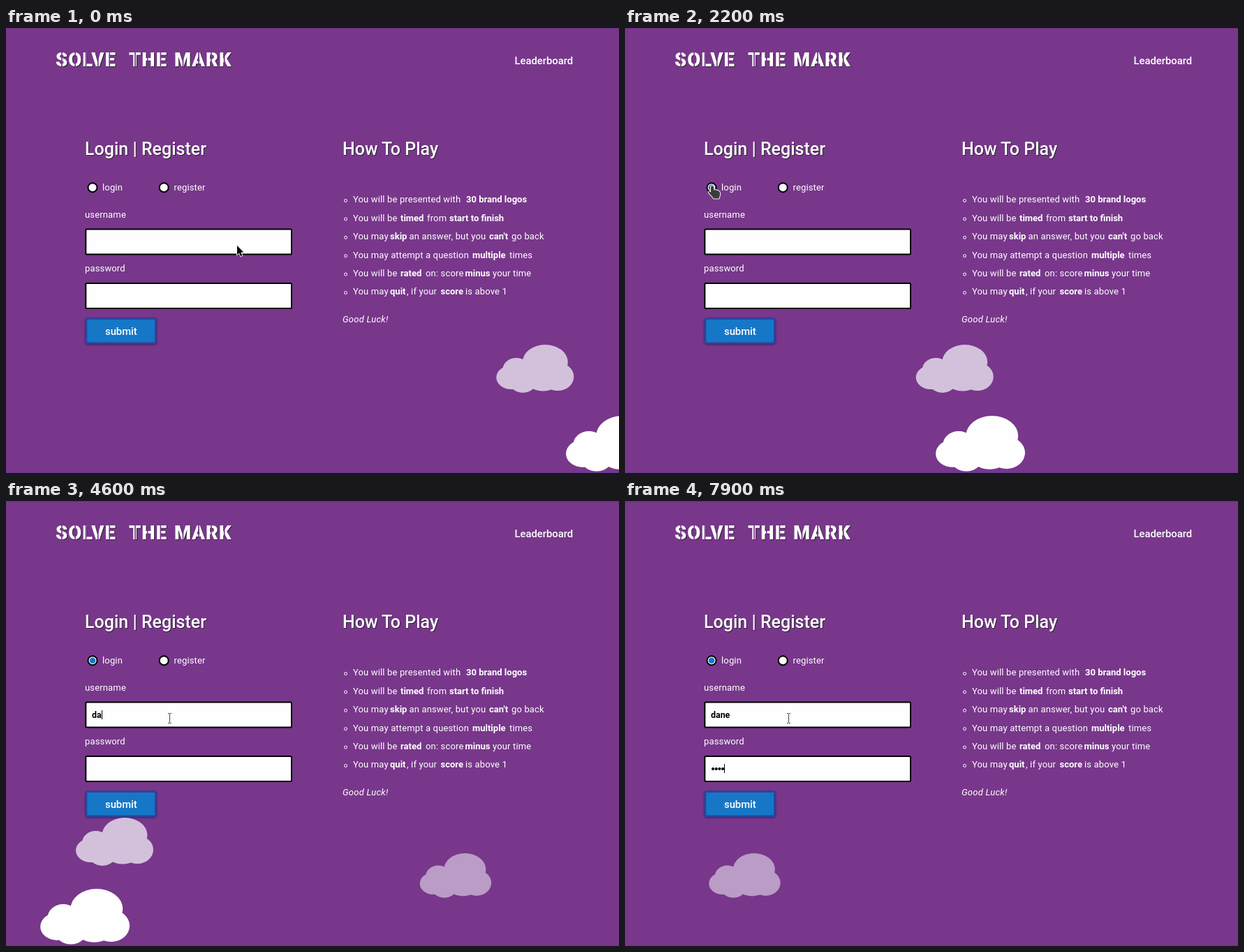
Recreate the animation shown at these times as an HTML page with a canvas. Size 878 by 638 pixels, loop 8 s.

```html
<!DOCTYPE html>
<html lang="en">
<head>
<meta charset="utf-8">
<title>Login</title>
<style>
  html, body { margin: 0; width: 878px; height: 638px; overflow: hidden; background: #78378b; }
  svg, canvas { position: absolute; left: 0; top: 0; display: block; }
  text { font: 400 13px Roboto, sans-serif; letter-spacing: .15px; fill: #fff; white-space: pre; }
  .b { font-weight: 700; letter-spacing: 0; }
  .i { font-style: italic; letter-spacing: .25px; }
  .h { font-size: 25px; font-weight: 500; letter-spacing: 0; filter: drop-shadow(1.3px 1.3px .4px #2b2530); }
  .t { font-size: 27.5px; font-weight: 900; letter-spacing: 1px; filter: drop-shadow(1.2px 1.2px .4px #2b2530); }
  .n { font-size: 14.8px; font-weight: 500; letter-spacing: 0; }
  .box { fill: #fffeff; stroke: #000; stroke-width: 2; }
  .btn { fill: #1677c7; stroke: #28449f; stroke-width: 2.5; filter: drop-shadow(0 1px 1.5px #33205a); }
  .dot { fill: none; stroke: #fff; stroke-width: 1; }
</style>
</head>
<body>
<svg id="page" width="878" height="638">
  <rect width="878" height="1" fill="#6a2f7d"/>
  <rect y="637" width="878" height="1" fill="#67398f"/>
  <rect class="box" x="114.3" y="288.5" width="294.7" height="36" rx="1.5"/>
  <rect class="box" x="114.3" y="366" width="294.7" height="36" rx="1.5"/>
  <rect class="btn" x="115" y="416.7" width="99.3" height="35" rx="2"/>
  <circle class="box" cx="124" cy="228.7" r="6.5"/>
  <circle class="box" cx="226.2" cy="228.7" r="6.5"/>
</svg>
<canvas id="view" width="878" height="638"></canvas>
<script>
const page = document.getElementById('page');
const ctx = document.getElementById('view').getContext('2d');
const USER = 'dane';
const LOOP = 8000;

function add(tag, attrs, content) {
  const el = document.createElementNS('http://www.w3.org/2000/svg', tag);
  for (const k in attrs) el.setAttribute(k, attrs[k]);
  if (content) el.textContent = content;
  return page.appendChild(el);
}
const label = (x, y, str, cls = '') => add('text', { x, y, class: cls }, str);

// Stencil title: each glyph is cut by a thin vertical slit
const slits = { S: .5, O: .5, L: .42, V: .5, E: .42, T: .5, H: .42, M: .5, A: .5, R: .42, K: .42 };
for (const [x, word] of [[71, 'SOLVE'], [176, 'THE'], [241, 'MARK']]) {
  const el = label(x, 54.5, word, 't');
  [...word].forEach((c, i) => {
    const g = el.getExtentOfChar(i);
    add('rect', { x: g.x + g.width * slits[c] - 1, y: 33, width: 1.7, height: 24, fill: '#78378b' });
  });
}

label(728.5, 52, 'Leaderboard', 'n');
label(113, 181.5, 'Login | Register', 'h');
label(482, 181.5, 'How To Play', 'h');
label(138, 232.5, 'login');
label(240.5, 232.5, 'register');
label(113, 271.5, 'username');
label(113, 349, 'password');
label(142, 440, 'submit', 'n');
label(482, 421.5, 'Good Luck!', 'i');

// Rules: alternating plain and bold runs
const rules = [
  [497, 'You will be presented with', 659, '30 brand logos'],
  [497, 'You will be', 565, 'timed', 603, 'from', 635, 'start to finish'],
  [497, 'You may', 550, 'skip', 577.5, 'an answer, but you', 692, "can't", 724, 'go back'],
  [497, 'You may attempt a question', 668, 'multiple', 721, 'times'],
  [497, 'You will be', 565, 'rated', 601, 'on: score', 657.5, 'minus', 697, 'your time'],
  [497, 'You may', 550, 'quit', 574, ', if your', 622.5, 'score', 658, 'is above 1']
];
rules.forEach((runs, row) => {
  const y = 250.3 + row * 26.4;
  add('circle', { class: 'dot', cx: 486.5, cy: y - 2.8, r: 2 });
  for (let i = 0; i < runs.length; i += 2) label(runs[i], y, runs[i + 1], i % 4 ? 'b' : '');
});

// Linear interpolation through [time, value...] keys
function track(keys, t) {
  let i = 1;
  while (i < keys.length - 1 && t > keys[i][0]) i++;
  const a = keys[i - 1], b = keys[i];
  const p = Math.min(1, (t - a[0]) / (b[0] - a[0]));
  return a.slice(1).map((v, k) => v + (b[k + 1] - v) * p);
}

// Shared drift of all clouds; each has its own rate
const drift = [[0, 0], [800, 104.3], [900, 126.4], [2200, 285.6], [3600, 477.5], [4500, 591],
  [4600, 602.3], [5400, 711.2], [6300, 824.3], [6400, 836.2], [7200, 947.4], [7900, 1036.6]];
const clouds = [
  { x: 702.3, y: 454, rate: 1, size: 1, color: '#d3c1db' },
  { x: 802, y: 556, rate: 1.25, size: 1.153, color: '#fefefe' },
  { x: 1248, y: 505, rate: 1.088, size: .923, color: '#ba9cc6' }
];
const puffs = [[70, 25, 32.5, 25], [28.5, 36, 19.5, 17], [21, 47, 21, 17], [38, 54, 19, 15],
  [67, 50, 24, 16.5], [88, 46, 23, 20], [56, 42, 30, 18]];

function cloud(c, d) {
  ctx.save();
  ctx.translate(c.x - d * c.rate, c.y);
  ctx.scale(c.size, c.size);
  ctx.fillStyle = c.color;
  ctx.beginPath();
  for (const [x, y, rx, ry] of puffs) {
    ctx.moveTo(x + rx, y);
    ctx.ellipse(x, y, rx, ry, 0, 0, Math.PI * 2);
  }
  ctx.fill();
  ctx.restore();
}

const mouse = [[0, 331, 312], [300, 318, 308], [600, 262, 292], [800, 200, 268], [900, 143, 240],
  [1000, 125, 226.5], [2400, 125, 226.5], [2500, 150, 245], [2600, 205, 286], [2700, 234, 311]];
const arrow = new Path2D('M0 0V13L3 10.4L5.2 15.2L7.4 14.2L5.2 9.6H9.3Z');
const hand = new Path2D('M-2 1Q0-1 2 1L2.4 6Q4 4.8 6 6.4Q8 6 10.5 8.5Q11.5 10 11 13L9.5 18H2L-1 14L-5.3 9.5Q-5 7-2 9Z');

function pointer(t) {
  const [x, y] = track(mouse, t);
  ctx.save();
  ctx.lineJoin = 'round';
  if (t >= 2700) {
    ctx.fillStyle = '#444';
    ctx.fillRect(x, 305, 1, 13);
    for (const top of [304, 318]) {
      ctx.fillRect(x - 2, top, 2, 1);
      ctx.fillRect(x + 1, top, 2, 1);
    }
  } else {
    const shape = t >= 1000 && t <= 2400 ? hand : arrow;
    ctx.translate(x, y);
    ctx.lineWidth = 2;
    ctx.strokeStyle = '#eee';
    ctx.stroke(shape);
    ctx.fillStyle = shape === hand ? '#3b3b3b' : '#0a0a0a';
    ctx.fill(shape);
  }
  ctx.restore();
}

const userKeys = [4300, 4500, 4700, 4800];
const passKeys = [7200, 7400, 7600, 7800];
const typed = (keys, t) => keys.filter(k => k <= t).length;

function caret(x, y, t, resets) {
  const last = Math.max(...resets.filter(k => k <= t));
  if ((t - last) % 1000 < 500) {
    ctx.fillStyle = '#000';
    ctx.fillRect(Math.round(x), y, 1, 13);
  }
}

function form(t) {
  if (t >= 2000) {
    ctx.fillStyle = '#1677c7';
    ctx.beginPath();
    ctx.arc(124, 228.7, 4.3, 0, Math.PI * 2);
    ctx.fill();
  }
  const name = USER.slice(0, typed(userKeys, t));
  ctx.font = '700 12.4px Roboto, sans-serif';
  ctx.fillStyle = '#000';
  ctx.fillText(name, 123, 311);
  const dots = typed(passKeys, t);
  for (let i = 0; i < dots; i++) {
    ctx.beginPath();
    ctx.arc(126 + i * 4.7, 384, 2.1, 0, Math.PI * 2);
    ctx.fill();
  }
  if (t >= 6600) caret(123.6 + dots * 4.7, 377, t, [6600, ...passKeys]);
  else if (t >= 2800 && t < 6400) caret(123.5 + ctx.measureText(name).width, 300, t, [2800, ...userKeys]);
}

function draw(t) {
  ctx.clearRect(0, 0, 878, 638);
  const [d] = track(drift, t);
  for (const c of clouds) cloud(c, d);
  form(t);
  pointer(t);
}

const start = performance.now();
function tick() {
  const t = (performance.now() - start) % LOOP;
  draw(Math.floor(t / 100) * 100);
  requestAnimationFrame(tick);
}
tick();
</script>
</body>
</html>
```
